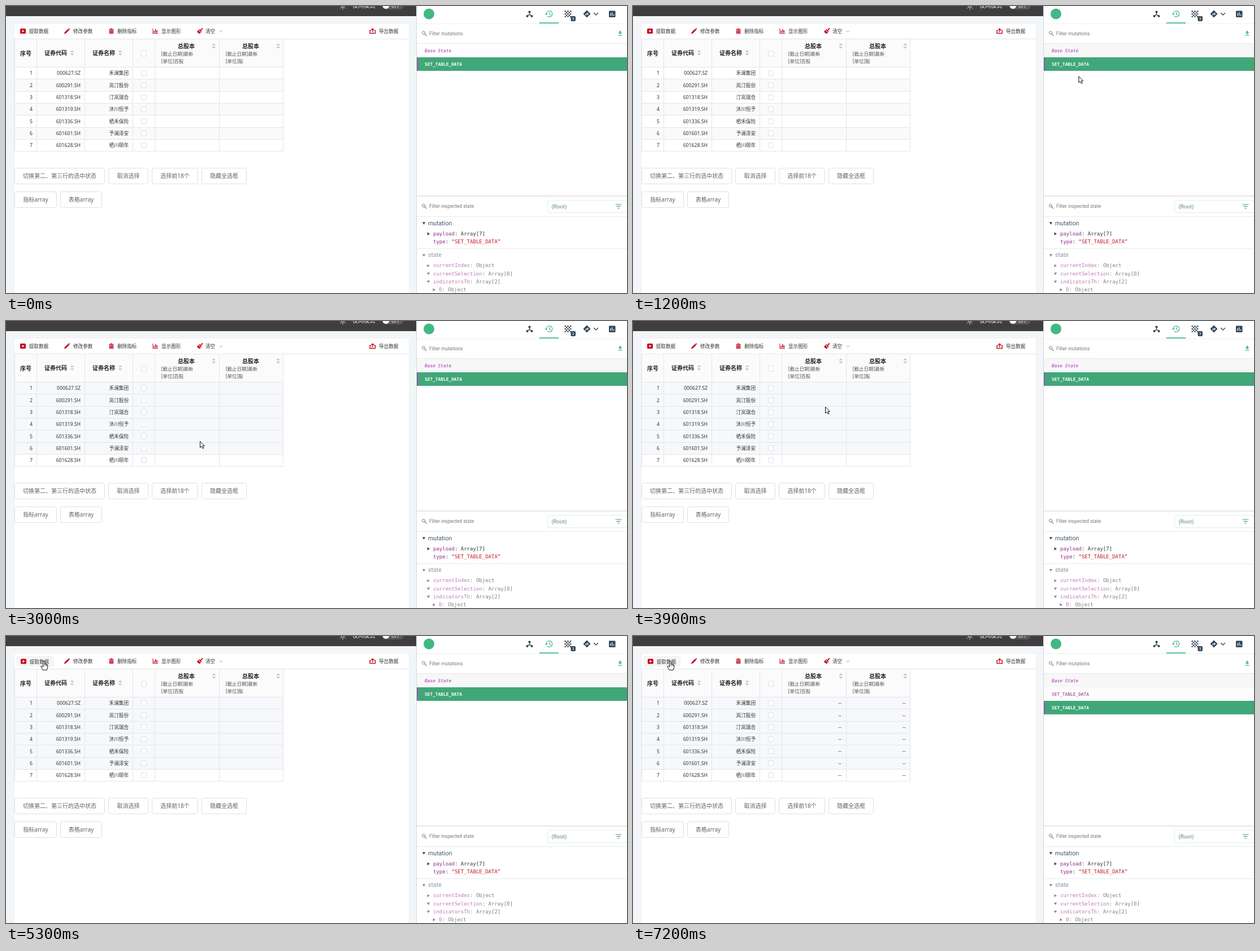
An HTML page for the animation above (8 s loop, 1099 by 509 pixels).

```html
<!DOCTYPE html>
<html lang="zh">
<head>
<meta charset="utf-8">
<title>Table and mutation inspector</title>
<style>
html, body { margin: 0; width: 100%; height: 100%; overflow: hidden; background: #fff; }
svg { display: block; width: 100vw; height: 100vh; }
text { font-family: "Noto Sans", "Noto Sans CJK SC", "Noto Sans CJK", sans-serif; white-space: pre; }
.ui { font-family: Roboto, sans-serif; }
.mono { font-family: "DejaVu Sans Mono", monospace; }
.line { fill: none; stroke-linecap: round; stroke-linejoin: round; }

/* Each leg advances once per 100 ms (1.25% of the loop). */
#pointer { animation: travel 8s infinite; }
@keyframes travel {
  0%, 11.25% { transform: translate(1087px, 41px); animation-timing-function: step-end; }
  12.5% { transform: translate(966px, 92px); animation-timing-function: step-end; }
  13.75% { transform: translate(889px, 118px); animation-timing-function: steps(3); }
  17.5% { transform: translate(587px, 137px); animation-timing-function: step-end; }
  18.75% { transform: translate(525px, 135px); animation-timing-function: step-end; }
  20% { transform: translate(470px, 122px); animation-timing-function: step-end; }
  21.25% { transform: translate(440px, 109px); animation-timing-function: step-end; }
  22.5% { transform: translate(405px, 115px); animation-timing-function: steps(8); }
  32.5% { transform: translate(377px, 159px); animation-timing-function: steps(4); }
  37.5% { transform: translate(343px, 213px); animation-timing-function: steps(5); }
  43.75% { transform: translate(342px, 203px); animation-timing-function: steps(4); }
  48.75% { transform: translate(340px, 152px); animation-timing-function: steps(5); }
  55% { transform: translate(316px, 236px); animation-timing-function: steps(3); }
  58.75% { transform: translate(170px, 122px); animation-timing-function: steps(3); }
  62.5% { transform: translate(77px, 48px); animation-timing-function: steps(3); }
  66.25% { transform: translate(67px, 44px); animation-timing-function: step-end; }
  76.25%, 100% { transform: translate(66px, 44px); }
}
</style>
</head>
<body>
<svg id="stage" viewBox="0 0 1099 509" preserveAspectRatio="none"></svg>
<script>
const LOOP = 8000;
const RED = '#c5081f', DARK = '#304455', GREEN = '#41a778', PURPLE = '#92278f';
const keyframes = [];

const text = (x, y, str, size, fill, extra = '') =>
  `<text x="${x}" y="${y}" font-size="${size}" fill="${fill}" ${extra}>${str}</text>`;
const box = (x, y, w, h, fill, extra = '') =>
  `<rect x="${x}" y="${y}" width="${w}" height="${h}" fill="${fill}" ${extra}/>`;
const path = (d, fill, extra = '') => `<path d="${d}" fill="${fill}" ${extra}/>`;
const stroke = (d, color, width = 1) =>
  `<path class="line" d="${d}" stroke="${color}" stroke-width="${width}"/>`;
const at = (x, y, body) => `<g transform="translate(${x} ${y})">${body}</g>`;
const hline = (x, y, w, color) => box(x, y, w, 1, color);
const END = 'text-anchor="end"', MID = 'text-anchor="middle"', BOLD = 'font-weight="700"';

// Shows the body only during the given [from, to) spans of the loop.
function during(body, ...spans) {
  const name = 'show' + keyframes.length;
  const pct = ms => ms / LOOP * 100 + '%';
  let stops = '0% { visibility: hidden }';
  for (const [from, to = LOOP] of spans) {
    stops += `${pct(from)} { visibility: visible }`;
    stops += `${pct(to)} { visibility: ${to === LOOP ? 'visible' : 'hidden'} }`;
  }
  keyframes.push(`@keyframes ${name} { ${stops} }`);
  return `<g style="visibility:hidden;animation:${name} ${LOOP}ms step-end infinite">${body}</g>`;
}

const pencil = (color, s = 1) => `<g transform="scale(${s})">` +
  path('M-5 5L-4.3 2L2 -4L4 -2L-2 4ZM2.6 -4.6L3.6 -5.4L5.4 -3.6L4.6 -2.6Z', color) + '</g>';
const bin = (color, s = 1) => `<g transform="scale(${s})">` +
  path('M-5 -4H-2L-1.5 -5.2H1.5L2 -4H5V-2.8H-5ZM-4 -2H4V5H-4Z', color) +
  stroke('M-1.6 -.5V3.5M1.6 -.5V3.5', '#fff', .9) + '</g>';
const search = (x, y) => at(x, y,
  `<circle class="line" cx="-1" cy="-1" r="2.6" stroke="#7d8790"/>` + stroke('M1 1L4 4', '#7d8790', 1.2));
const sorter = (x, y) => at(x, y, path('M-3.5 -1.2L0 -4.8L3.5 -1.2ZM-3.5 1.2L0 4.8L3.5 1.2Z', '#c0c4cc'));
const clock = (color, s = 1) => `<g transform="scale(${s})">` +
  stroke('M-4.8 0A5.3 5.3 0 1 1 -2.8 4.2M.7 -2.8V.5L3 1.8', color, 1.2) +
  path('M-7.4 -.5H-2.3L-4.8 2.3Z', color) + '</g>';

function pageHeader() {
  const rays = Array.from({ length: 8 }, (_, i) => {
    const c = Math.cos(i * Math.PI / 4), s = Math.sin(i * Math.PI / 4);
    return `M${c * 5} ${s * 5}L${c * 6.5} ${s * 6.5}`;
  }).join('');
  return box(0, 0, 727, 509, '#f3f6f8') + box(0, 0, 727, 18, '#403d3e') +
    at(596, -.5, '<circle class="line" r="3" stroke="#fff"/>' + stroke(rays, '#fff')) +
    text(613, 3, '夜间模式', 10, '#fff') +
    box(665, -8, 39, 14, '#5c595a', 'rx="7"') + '<circle cx="672.5" cy="-1" r="6" fill="#fff"/>' +
    text(682, 3, 'OFF', 8, '#fff') +
    box(14, 30, 700, 490, '#edf0f2') + box(15, 31, 698, 480, '#fff');
}

function toolbar() {
  const label = (x, str) => text(x, 48.2, str, 8.6, '#333');
  const fetchButton = box(25, 40, 10, 9, RED, 'rx="1.5"') + path('M28.7 42.3L32.5 44.5L28.7 46.7Z', '#fff') +
    label(40.7, '提取数据');
  return during(fetchButton, [0, 5000]) +
    during(box(19.5, 36.5, 64, 17, '#f6f6f7', 'stroke="#eee" rx="2"') + at(1, .5, fetchButton), [5000]) +
    at(108, 44.5, pencil(RED)) + label(119, '修改参数') +
    at(186.5, 44.5, bin(RED, .9)) + label(197, '删除指标') +
    path('M259.5 40h1v8h8.5v1h-9.5ZM261.5 44h1.5v3.3h-1.5ZM264 41h1.5v6.3H264ZM266.5 43h1.5v4.3h-1.5Z', RED) +
    label(275, '显示图形') +
    at(343, 44.5, stroke('M4.5 -4.5L1.5 -1.5', RED, 1.8) + path('M-1 -3.5L3.5 1L2.5 2.2L-2.2 -2.4ZM-2.8 -1.8L1.8 2.8L-.5 5L-2 3.5L-2.5 4L-5 1Z', RED)) +
    label(353, '清空') + stroke('M377.8 43.8L380.3 46.2L382.8 43.8', '#999', .9) +
    stroke('M645.5 43.5H644V48.5H653.5V43.5H652M648.8 46V40.5M646.8 42.3L648.8 40.3L650.8 42.3', RED, 1.4) +
    label(660, '导出数据');
}

const rowY = i => 108.5 + i * 21.3;

function table() {
  const rows = [
    ['000627.SZ', '禾澜集团', 1700], ['600291.SH', '岚汀股份', 2100], ['601318.SH', '汀岚瑞合', 2500],
    ['601319.SH', '沐川恒予', 2700], ['601336.SH', '栖禾保险', 2900], ['601601.SH', '予澜泽安', 3000],
    ['601628.SH', '栖川颐年']
  ];
  const ink = '#333', border = '#e3e5e8';
  const checkbox = y => box(239.5, y - 4.5, 9, 9, '#fff', 'stroke="#dcdfe6" rx="1"');
  const title = (x, y, str) => text(x, y, str, 10, '#222', `${MID} ${BOLD}`);
  let out = box(15, 58, 476, 50, '#fbfbfc');
  rows.forEach(([code, name, hover], i) => {
    const y = rowY(i), mid = y + 10.7;
    if (i % 2) out += box(15, y, 476, 21.3, '#fafafa');
    if (hover) out += during(box(15, y, 476, 21.3, '#f6f8fb'), [hover]);
    out += text(47, mid + 3.2, i + 1, 8.7, ink, END) + text(132, mid + 3.2, code, 8.7, ink, END) +
      text(217, mid + 3.2, name, 8.6, ink, END) + checkbox(mid);
  });
  out += during(rows.map((_, i) => [369, 482.5].map(x =>
    text(x, rowY(i) + 13.7, '--', 9.5, ink, END)).join('')).join(''), [6800]);
  for (let i = 0; i <= 7; i++) out += hline(15, Math.floor(rowY(i)), 476, border);
  out += hline(15, 58, 698, border);
  for (const x of [15, 54, 139, 224, 263, 377, 490]) out += box(x, 58, 1, 200, border);
  out += title(35, 88, '序号') + title(88, 87, '证券代码') + title(173, 87, '证券名称') +
    sorter(117, 83) + sorter(202, 83) + checkbox(84.5);
  [['百股', 263], ['股', 377]].forEach(([unit, x]) => {
    out += title(x + 56, 74.5, '总股本') + sorter(x + 104.7, 71) +
      text(x + 11.7, 88, '[截止日期]最新', 8.5, '#555') + text(x + 11.7, 101, `[单位]${unit}`, 8.5, '#555');
  });
  return out + during(at(482, 91, pencil('#555', .75)) + at(482, 101, bin('#555', .7)), [1700, 2400]);
}

function buttons() {
  return [
    [15.5, 287.5, 159, '切换第二、第三行的选中状态'], [181.5, 287.5, 70, '取消选择'],
    [258.5, 287.5, 81, '选择前18个'], [346.5, 287.5, 79, '隐藏全选框'],
    [15.5, 329.5, 74, '指标array'], [96.5, 329.5, 73, '表格array']
  ].map(([x, y, w, label]) => box(x, y, w, 28, '#fff', 'stroke="#dcdfe6" rx="3"') +
    text(x + w / 2, y + 17.7, label, 10, '#606266', MID)).join('');
}

function inspectorTop() {
  const dots = Array.from({ length: 13 }, (_, i) => {
    const x = i * 2 % 5, y = Math.floor(i * 2 / 5);
    return `<circle cx="${x * 2.4 - 4.8}" cy="${y * 2.4 - 4.8}" r="1.3"/>`;
  }).join('');
  return box(727, 0, 372, 509, '#fff') + box(726, 0, 1, 509, '#d5d9dc') +
    '<circle cx="748.5" cy="14" r="9.5" fill="#41b883"/>' +
    at(926.5, 14, stroke('M0 -3V1L-4 4M0 1L4 4', DARK, 1.4) +
      `<g fill="${DARK}"><circle cy="-3.5" r="2.1"/><circle cx="-4" cy="4" r="2"/><circle cx="4" cy="4" r="2"/></g>`) +
    at(961, 14, clock('#42b983')) + box(944, 29, 34, 2, '#5fc49a') +
    at(994.5, 14, `<g fill="${DARK}">${dots}</g>`) +
    box(999.5, 18, 8.5, 9, DARK, 'rx="2"') + text(1003.8, 25, 3, 7, '#fff', `class="ui" ${MID}`) +
    at(1028, 14, path('M0 -6.5L6.5 0L0 6.5L-6.5 0Z', DARK) + stroke('M-2 2.5V0H2M.7 -1.6L2.3 0L.7 1.6', '#fff', 1.1)) +
    stroke('M1040.5 12.5L1044 16L1047.5 12.5', DARK, 1.4) +
    box(1067, 8.5, 11.5, 11.5, DARK, 'rx="1.3"') + stroke('M1070 13V17M1072.8 11.5V17M1075.6 15V17', '#fff', 1.2) +
    hline(727, 31, 372, '#eeeeef') +
    search(740, 48.5) + text(749, 51.5, 'Filter mutations', 8.5, '#75797d', 'class="ui"') +
    path('M1085.5 44h3v3h2.2L1087 50.5L1083.3 47h2.2ZM1083.3 51.5h7.4v1.2h-7.4Z', '#55bd91') +
    hline(727, 66, 372, '#e8e9eb');
}

function mutations() {
  const entry = (y, fill, extra = '') =>
    text(741, y + 14.7, 'SET_TABLE_DATA', 7.83, fill, `class="mono" ${extra}`);
  const active = y => box(727, y, 372, 24, GREEN) + box(727, y, 2, 24, '#8a5aa8') + entry(y, '#fff', BOLD);
  return box(727, 67, 372, 24, '#fdfdfd') +
    during(box(727, 67, 372, 24, '#e4f1fd') + at(805, 78, clock('#42b983', .75)), [1000, 1100]) +
    during(box(727, 67, 372, 24, '#f7f7f8'), [1100]) +
    text(741, 81.7, 'Base State', 7.83, '#a52fae', 'class="mono" font-style="italic"') +
    during(active(91), [0, 7200]) +
    during(box(727, 91, 372, 24, '#fcfcfc') + entry(91, PURPLE) + active(115), [7200]);
}

function inspectedState() {
  const arrow = (x, y, open) => at(x, y, path(open ? 'M-2.7 -2H2.7L0 2.5Z' : 'M-2 -2.7V2.7L2.5 0Z', '#444'));
  const field = (x, y, key, value, color = '#333') => text(x, y,
    `<tspan fill="${PURPLE}">${key}</tspan>: <tspan fill="${color}">${value}</tspan>`, 9, '#444', 'class="mono"');
  const heading = (y, label) => arrow(739.5, y, true) + text(747, y + 3.2, label, 10.6, '#41566a', 'class="ui"');
  const state = [
    ['currentIndex', 'Object', false], ['currentSelection', 'Array[0]', true],
    ['indicatorsTh', 'Array[2]', true], ['0', 'Object', false]
  ].map(([key, value, open], i) => {
    const x = i === 3 ? 766 : 756, y = 463.3 + i * 14.2;
    return arrow(x - 8.5, y - 2.7, open) + field(x, y, key, value);
  }).join('');
  return box(727, 336, 372, 2, '#ebe4e7') + search(740, 355) +
    text(749, 358, 'Filter inspected state', 8.5, '#75797d', 'class="ui"') +
    box(958.5, 344.5, 145, 22, '#fff', 'stroke="#dcf1e8" rx="2"') +
    text(965.5, 358.8, '(Root)', 9.7, '#5c8585', 'class="ui"') +
    stroke('M1079 352H1089M1081 355.3H1087M1083 358.6H1085', '#4c967c', 1.2) +
    hline(727, 373, 372, '#e8e9eb') + heading(385.3, 'mutation') +
    arrow(747.5, 404, false) + field(756, 406.7, 'payload', 'Array[7]') +
    field(756, 421, 'type', '“SET_TABLE_DATA”', '#c41a2c') +
    hline(727, 430, 372, '#e8e9eb') + `<g opacity=".62">${heading(442, 'state')}${state}</g>`;
}

function pointer() {
  const outline = 'stroke="#111" stroke-width="1" stroke-linejoin="round"';
  const arrow = path('M.5 .5V11.5L3 9.2L5 13.2L6.9 12.3L5 8.5H8.3Z', '#fff', outline);
  const hand = path('M-1.3 1.6Q0 -.4 1.3 1.6V6Q2.6 5 3.6 6.4Q5 5.6 5.5 7.1Q6.8 6.8 6.8 8.4V11.5L5.2 16.4H-1.6L-5 10.7Q-5.3 8.6 -3.4 9.2L-1.3 11Z', '#fff', outline) +
    stroke('M1.3 6V9M3.6 6.5V9M5.5 7.3V9.2', '#111', .7);
  return `<g id="pointer">${during(arrow, [1200, 5000])}${during(hand, [900, 1200], [5000])}</g>`;
}

document.getElementById('stage').innerHTML = pageHeader() + toolbar() + table() + buttons() +
  inspectorTop() + mutations() + inspectedState() + pointer();
const sheet = document.createElement('style');
sheet.textContent = keyframes.join('\n');
document.head.append(sheet);
</script>
</body>
</html>
```
